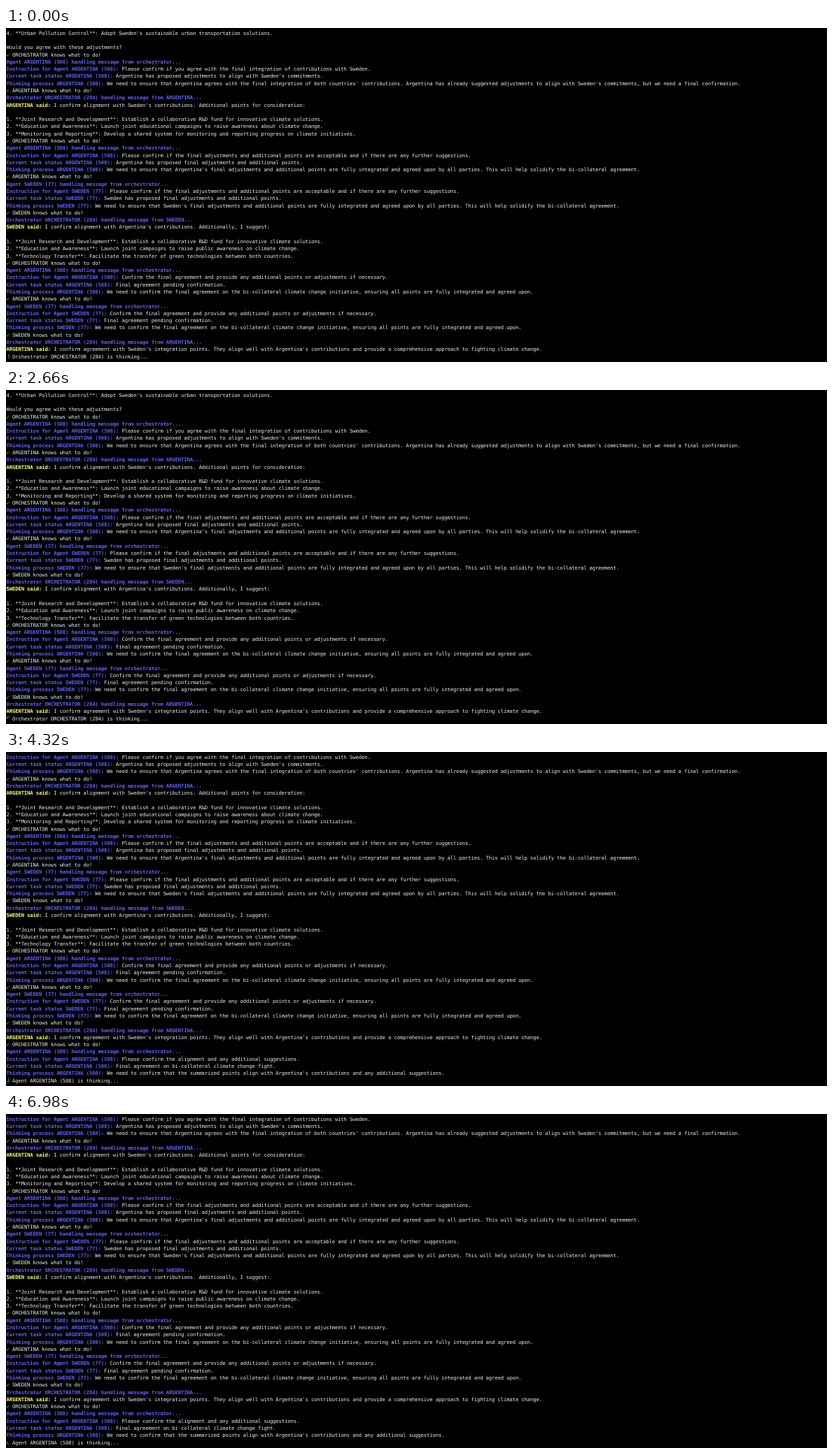
Animation of 1173x478 px, one loop 7 s. Source, as an HTML page:

```html
<!DOCTYPE html>
<html lang="en">
<head>
<meta charset="utf-8">
<title>Agent negotiation log</title>
<style>
  html, body { margin: 0; width: 100%; height: 100%; overflow: hidden; background: #000; }
  svg { display: block; width: 1173px; height: 478px; }
  text {
    font-family: "DejaVu Sans Mono", "Liberation Mono", monospace;
    fill: #ececec;
    white-space: pre;
    text-rendering: geometricPrecision;
  }
  .blue { fill: #5e60ff; font-weight: bold; }
  .yellow { fill: #ffff58; font-weight: bold; }
  .green { fill: #00c200; }
  .dot { fill: #18c5c8; }
  .cursor { fill: #c7c7c7; }
</style>
</head>
<body>
<svg id="screen" viewBox="0 0 1173 478"></svg>
<script>
// A 12 pt terminal font on a 7 x 17 pt cell grid, scaled to the stage
const PT = 0.60524, CELL = 7 * PT, ROW = 17 * PT, SIZE = 12 * PT;
const LEFT = 0.5, TOP = 2, BASE = 7.65, ADVANCE = 0.60205;
const ROWS = 45, SCROLL = 5, LOOP = 7000;
const screen = document.getElementById('screen');
screen.style.fontSize = SIZE + 'px';
screen.style.letterSpacing = CELL - SIZE * ADVANCE + 'px';

// Transcript, one entry per line: [tint, tinted part, plain part]
const lines = [];
const say = (...plain) => plain.forEach(p => lines.push(['', '', p]));
const done = name => lines.push(['check', '', name + ' knows what to do!']);
const said = (name, words) => lines.push(['yellow', name + ' said:', ' ' + words]);
const relay = name =>
  lines.push(['blue', `Orchestrator ORCHESTRATOR (284) handling message from ${name}...`, '']);

function task(name, id, instruction, status, thought) {
  const agent = `${name} (${id})`;
  lines.push(
    ['blue', `Agent ${agent} handling message from orchestrator...`, ''],
    ['blue', `Instruction for Agent ${agent}:`, ' ' + instruction],
    ['blue', `Current task status ${agent}:`, ' ' + status],
    ['blue', `Thinking process ${agent}:`, ' We need to ' + thought]);
}
const argentina = (...args) => task('ARGENTINA', 508, ...args);
const sweden = (...args) => task('SWEDEN', 77, ...args);

const ACCEPT = 'Please confirm if the final adjustments and additional points are acceptable and if there are any further suggestions.';
const SOLID = ' final adjustments and additional points are fully integrated and agreed upon by all parties. This will help solidify the bi-collateral agreement.';
const FINAL = [
  'Confirm the final agreement and provide any additional points or adjustments if necessary.',
  'Final agreement pending confirmation.',
  'confirm the final agreement on the bi-collateral climate change initiative, ensuring all points are fully integrated and agreed upon.'];
const RESEARCH = '1. **Joint Research and Development**: Establish a collaborative R&D fund for innovative climate solutions.';

say("4. **Urban Pollution Control**: Adopt Sweden's sustainable urban transportation solutions.",
  '', 'Would you agree with these adjustments?');
done('ORCHESTRATOR');
argentina('Please confirm if you agree with the final integration of contributions with Sweden.',
  "Argentina has proposed adjustments to align with Sweden's commitments.",
  "ensure that Argentina agrees with the final integration of both countries' contributions. Argentina has already suggested adjustments to align with Sweden's commitments, but we need a final confirmation.");
done('ARGENTINA');
relay('ARGENTINA');
said('ARGENTINA', "I confirm alignment with Sweden's contributions. Additional points for consideration:");
say('', RESEARCH,
  '2. **Education and Awareness**: Launch joint educational campaigns to raise awareness about climate change.',
  '3. **Monitoring and Reporting**: Develop a shared system for monitoring and reporting progress on climate initiatives.');
done('ORCHESTRATOR');
argentina(ACCEPT, 'Argentina has proposed final adjustments and additional points.',
  "ensure that Argentina's" + SOLID);
done('ARGENTINA');
sweden(ACCEPT, 'Sweden has proposed final adjustments and additional points.',
  "ensure that Sweden's" + SOLID);
done('SWEDEN');
relay('SWEDEN');
said('SWEDEN', "I confirm alignment with Argentina's contributions. Additionally, I suggest:");
say('', RESEARCH,
  '2. **Education and Awareness**: Launch joint campaigns to raise public awareness on climate change.',
  '3. **Technology Transfer**: Facilitate the transfer of green technologies between both countries.');
done('ORCHESTRATOR');
argentina(...FINAL);
done('ARGENTINA');
sweden(...FINAL);
done('SWEDEN');
relay('ARGENTINA');
said('ARGENTINA', "I confirm agreement with Sweden's integration points. They align well with Argentina's contributions and provide a comprehensive approach to fighting climate change.");
done('ORCHESTRATOR');
argentina('Please confirm the alignment and any additional suggestions.',
  'Final agreement on bi-collateral climate change fight.',
  "confirm that the summarized points align with Argentina's contributions and any additional suggestions.");

function add(parent, tag, attrs, content = '') {
  const el = document.createElementNS('http://www.w3.org/2000/svg', tag);
  for (const key in attrs) el.setAttribute(key, attrs[key]);
  el.textContent = content;
  return parent.appendChild(el);
}
const colX = col => LEFT + col * CELL;
const rowY = row => TOP + row * ROW;
const show = (el, on) => { el.style.display = on ? '' : 'none'; };

const rows = lines.map(([tint, head, tail]) => {
  const g = add(screen, 'g', {});
  if (tint === 'check') {
    add(g, 'text', { x: LEFT, y: BASE, class: 'green' }, '✔');
    add(g, 'text', { x: colX(2), y: BASE }, tail);
  } else {
    const text = add(g, 'text', { x: LEFT, y: BASE });
    if (head) add(text, 'tspan', { class: tint }, head);
    if (tail) add(text, 'tspan', {}, tail);
  }
  return g;
});

// Status line: six-dot braille spinner, label and block cursor
const status = add(screen, 'g', { transform: `translate(0 ${rowY(ROWS)})` });
const dots = Array.from({ length: 6 }, (_, i) => add(status, 'circle', {
  class: 'dot', r: 0.8, cx: i < 3 ? 1.7 : 3.8, cy: 2.8 + (i % 3) * 2.1
}));
const label = add(status, 'text', { x: colX(2), y: BASE });
const cursor = add(status, 'rect', { class: 'cursor', x: LEFT, y: 0, width: CELL, height: ROW });

const SPINNER = '⠋⠙⠹⠸⠼⠴⠦⠧⠇⠏';
const PROMPT = 71;
// [tick, spinner step]
const STEPS = [[0, 3], [40, 21], [70, 37], [72, 40], [92, 54], [124, 71], [149, 86]];

// The terminal repaints three times every 140 ms
function tickAt(ms) {
  const phase = ms % 140;
  return Math.floor(ms / 140) * 3 + (phase < 20 ? 0 : phase < 120 ? 1 : 2);
}

function spinAt(tick) {
  const i = Math.max(1, STEPS.findIndex(s => s[0] >= tick));
  const [t0, s0] = STEPS[i - 1], [t1, s1] = STEPS[i];
  return Math.floor(s0 + (s1 - s0) * (tick - t0) / (t1 - t0) + 1e-6) % 10;
}

let last = -1;
function draw(ms) {
  const tick = tickAt(ms);
  if (tick === last) return;
  last = tick;
  const shift = tick < PROMPT ? 0 : SCROLL;
  rows.forEach((g, i) => {
    const row = i - shift;
    show(g, row >= 0 && row < ROWS);
    g.setAttribute('transform', `translate(0 ${rowY(row)})`);
  });
  const idle = tick === PROMPT;
  const mask = SPINNER.charCodeAt(spinAt(tick)) - 0x2800;
  dots.forEach((dot, i) => show(dot, !idle && mask >> i & 1));
  show(label, !idle);
  show(cursor, idle);
  label.textContent =
    (shift ? 'Agent ARGENTINA (508)' : 'Orchestrator ORCHESTRATOR (284)') + ' is thinking...';
}

const start = performance.now();
function loop() {
  draw((performance.now() - start) % LOOP);
  requestAnimationFrame(loop);
}
loop();
</script>
</body>
</html>
```
